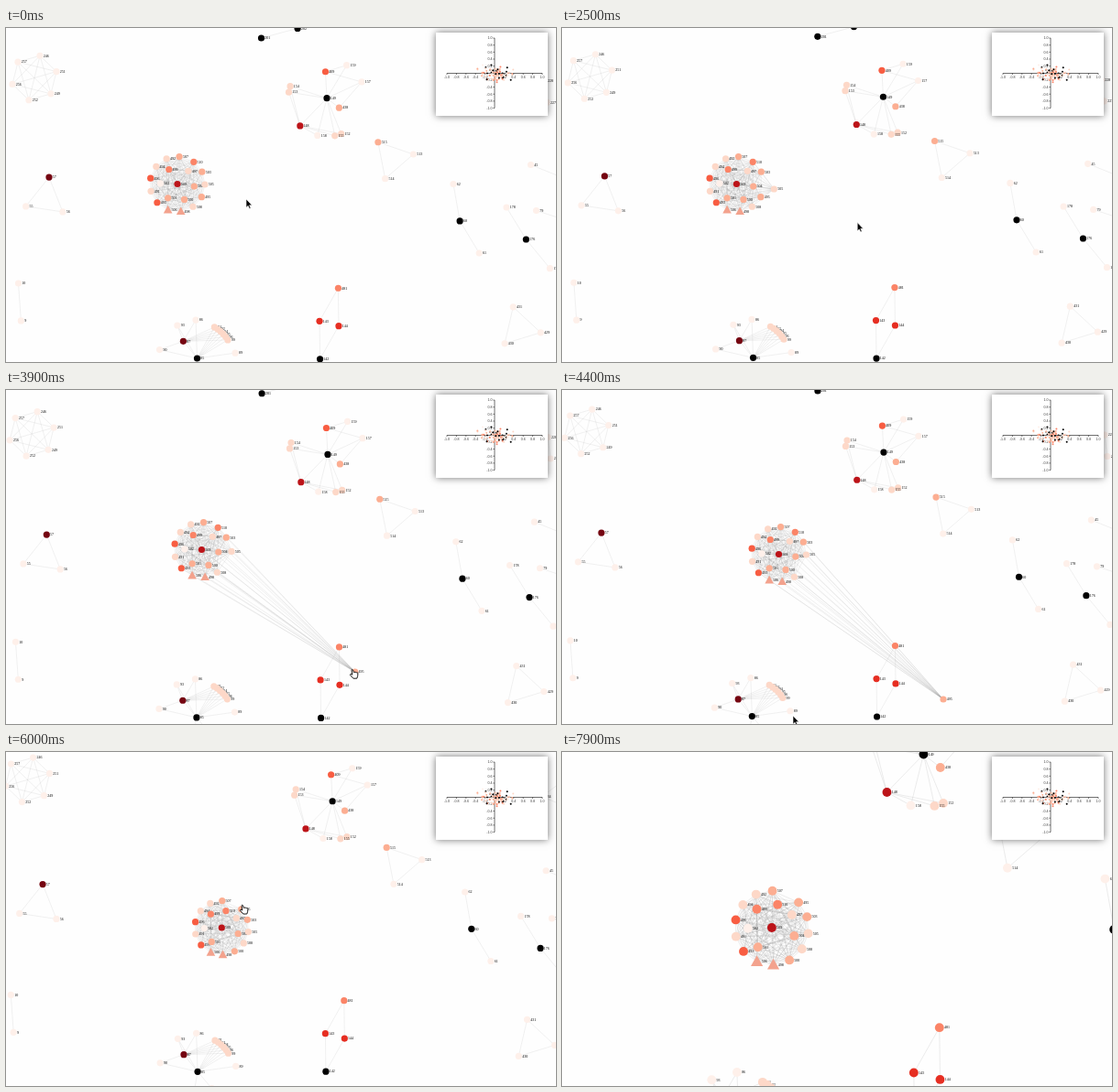
An HTML page with a canvas for the animation above (8 s loop, 600 by 365 pixels).

```html
<!DOCTYPE html>
<html lang="en">
<head>
<meta charset="utf-8">
<title>Force-directed network</title>
<style>
html, body { margin: 0; width: 100%; height: 100%; overflow: hidden; background: #fefefe }
canvas { display: block; width: 600px; height: 365px }
</style>
</head>
<body>
<canvas id="stage"></canvas>
<script>
const LOOP = 8000, STEP = 100, EDGE = 42, RADIUS = 3.6;
const canvas = document.getElementById('stage'), ctx = canvas.getContext('2d');
const dpr = window.devicePixelRatio || 1;
canvas.width = 600 * dpr;
canvas.height = 365 * dpr;

// Linear interpolation over keys of the form [time, ...values]
function at(keys, t) {
  let i = keys.findIndex(k => k[0] > t);
  if (i < 0) i = keys.length;
  const a = keys[Math.max(i - 1, 0)], b = keys[Math.min(i, keys.length - 1)];
  const u = a === b ? 0 : (t - a[0]) / (b[0] - a[0]);
  return a.slice(1).map((v, j) => v + (b[j + 1] - v) * u);
}
const mix = (a, b, u) => a.map((v, i) => v + (b[i] - v) * u);
const polar = (x, y, r, deg) => [x + r * Math.cos(deg * Math.PI / 180), y + r * Math.sin(deg * Math.PI / 180)];
const words = text => text.split(' ');

// Pale to dark, then black, with the labels that wear each color
const palette = [
  ['#fef0ea', ''],
  ['#fdd8c8', '154 153 152 155 91 92 94 95 96 99 492 494 497 491 508 505'],
  ['#fcae92', '438 515 507 495 503 504 501 500'],
  ['#fb8467', '481 510 499'],
  ['#f85d42', '409 496 493'],
  ['#e62e22', '143 144'],
  ['#bc1419', '148 509'],
  ['#750511', '57 87'],
  ['#000', '85 149 60 176 142 201 202']
];
const colorOf = label => (palette.find(([, list]) => words(list).includes(label)) || palette[0])[0];

const nodes = {}, links = [];

// Components spread away from each other: [time, growth, shift x, shift y]
const drift = [[1900, 0, 0, 0], [3300, 0.007, -1.4, -3.9], [4400, 0.0162, -4.7, -10], [6000, 0.043, -8.8, -26.5]];

const every = () => true, path = (i, j) => i - j === 1, hub = (i, j) => j === 0;

function connect(labels, linked, extra = '') {
  labels.forEach((a, i) => labels.slice(0, i).forEach((b, j) => linked(i, j) && links.push([a, b])));
  if (extra) for (const pair of words(extra)) links.push(pair.split('-'));
}

function group(names, place, linked, extra) {
  const labels = words(names), points = labels.map((_, i) => place(i));
  const mean = [0, 1].map(k => points.reduce((sum, p) => sum + p[k], 0) / points.length);
  labels.forEach((label, i) => {
    nodes[label] = t => {
      const [grow, ...shift] = at(drift, t);
      return points[i].map((v, k) => v + grow * mean[k] + shift[k]);
    };
  });
  connect(labels, linked, extra);
}

const ring = (x, y, r, start, step) => i => polar(x, y, r, start + i * step);

function chain(x, y, heading, turn = 0) {
  const points = [[x, y]];
  return i => {
    while (points.length <= i) points.push(polar(...points.at(-1), EDGE - 1, heading + turn * (points.length - 1)));
    return points[i];
  };
}

// Node 0 in the middle, then one node per angle or [angle, length]
const spokes = (x, y, stems) => i => {
  if (!i) return [x, y];
  const [deg, length = EDGE] = [stems[i - 1]].flat();
  return polar(x, y, length, deg);
};

group('257 246 251 249 252 256', ring(31, 54.5, 25, -136, 60), every);
group('57 55 56', ring(43.5, 186.3, 23.5, -81.5, -120), every);
group('515 513 514', ring(421.3, 142.5, 23.5, -131, 120), every);
group('431 429 430', ring(560.2, 327.5, 23.7, -107, 120), every);
group('228 227 234', ring(582, 70.5, 13.6, -67, 120), every);
group('10 9', chain(13.5, 279, 86), path);
group('62 60 61', chain(488, 170.5, 80, -21), path);
group('178 176 177', chain(546, 196, 58.6, -8), path);
group('45 46', chain(572.5, 149.5, 22), path);
group('79 78', chain(578.5, 199.5, 18), path);
group('201 202 203', chain(278.5, 11, -15, -8), path);
// Thin rhombus
group('481 143 142 144', i => polar(352.5, 323, i % 2 ? 10.8 : 40, -75.6 - 90 * i), path, '144-481');
group('149 154 153 159 157 158 155 152 148 409 438',
  spokes(350, 76.7, [198, 189, -59, -25, 104, 78, 68, 134, [-93, 29], [38, 17]]), hub,
  '148-154 148-153 148-152 148-155 148-158 409-159 409-157 438-157 153-154');
group('85 87 93 86 90 89 97 98 91 92 94 95 96 99',
  spokes(208.5, 361, [[-129, 24], -121, -92, -167, -8, [100, 24], [50, 24],
    ...Array.from({ length: 6 }, (_, i) => [-61 + 6 * i, 39])]), hub,
  '87-93 87-86 87-90 87-91 87-92 87-94 87-95 87-96 87-99');

// Dense cluster: two rings around one node, reordered after the pull; _ is an empty slot
const slots = (names, r, start, step) => words(names).map((label, i) => [label, polar(0, 0, r, start + i * step)]);
const before = Object.fromEntries([['509', [0, 0]],
  ...slots('507 492 494 496 491 493 506 498 508 495 505 503 510', 30, -86, -27.3),
  ...slots('499 502 501 500 504 497', 18.5, -120, -58)]);
const after = Object.fromEntries([['509', [0, 0]],
  ...slots('507 492 494 496 491 493 506 498 500 508 505 503 495', 29.4, -89, -26.2),
  ...slots('510 499 502 501 _ 504 497', 19, -76, -52.8)]);
const center = [[1900, 187, 170.5], [3300, 195, 170.5], [3500, 195, 170.5], [4400, 236.5, 179.5], [6000, 235.3, 192]];
const reorder = [[4400, 0], [6000, 1]];
const pulls = {
  505: { to: [337, 224], keys: [[1100, 0], [1700, 1], [1900, 0.12], [3500, 0.05], [4400, 0]] },
  495: { to: [416, 338], keys: [[3500, 0], [4000, 1], [4800, 1], [5600, 0]] }
};
for (const label in before) nodes[label] = t => {
  const mid = at(center, t), slot = mix(before[label], after[label], at(reorder, t)[0]);
  const home = [mid[0] + slot[0], mid[1] + slot[1]], pull = pulls[label];
  return pull ? mix(home, pull.to, at(pull.keys, t)[0]) : home;
};
connect(Object.keys(before), every);

// Zoom toward the cluster: [time, scale, x, y]
const view = [[6200, 1, 0, 0], [6700, 1.26, -65.3, -47], [7900, 1.37, -93.5, -71]];

function drawNetwork(t) {
  const [scale, dx, dy] = at(view, t), pos = {};
  for (const label in nodes) pos[label] = nodes[label](t);
  ctx.save();
  ctx.translate(dx, dy);
  ctx.scale(scale, scale);
  ctx.strokeStyle = 'rgba(140,140,140,.17)';
  ctx.lineWidth = 0.7;
  for (const [a, b] of links) {
    ctx.beginPath();
    ctx.moveTo(...pos[a]);
    ctx.lineTo(...pos[b]);
    ctx.stroke();
  }
  // Labels keep their size on screen
  ctx.font = `${4 / scale}px "Liberation Serif", serif`;
  ctx.textAlign = 'left';
  for (const label in pos) {
    const [x, y] = pos[label], triangle = label === '506' || label === '498';
    ctx.fillStyle = triangle ? '#f3a28d' : colorOf(label);
    ctx.beginPath();
    if (triangle) {
      ctx.moveTo(x, y - 4.8);
      ctx.lineTo(x + 4.8, y + 3.8);
      ctx.lineTo(x - 4.8, y + 3.8);
    } else ctx.arc(x, y, RADIUS, 0, 7);
    ctx.fill();
    ctx.fillStyle = '#000';
    ctx.fillText(label, x + 3.8, y + 1.3 / scale);
  }
  ctx.restore();
}

// Scatter plot dots from a seeded generator
let seed = 11;
const random = () => (seed = seed * 16807 % 2147483647) / 2147483647;
const bell = () => random() + random() - 1;
const dotColors = [0, 1, 1, 1, 2, 2, 2, 3, 8, 8].map(i => palette[i][0]);
const dots = Array.from({ length: 95 }, () =>
  [535 + bell() * 21, 49.5 + bell() * 10, dotColors[Math.floor(random() * 10)]]);

function drawPlot() {
  ctx.save();
  ctx.shadowColor = 'rgba(0,0,0,.55)';
  ctx.shadowBlur = 8 * dpr;
  ctx.fillStyle = '#fff';
  ctx.fillRect(469, 5, 122, 91);
  ctx.restore();
  ctx.strokeStyle = ctx.fillStyle = '#333';
  ctx.lineWidth = 0.7;
  ctx.font = '3.6px "Liberation Sans", sans-serif';
  ctx.beginPath();
  ctx.moveTo(481, 49.5);
  ctx.lineTo(585, 49.5);
  ctx.moveTo(533, 11);
  ctx.lineTo(533, 87.5);
  for (let i = -5; i <= 5; i++) {
    if (!i) continue;
    const x = 533 + i * 10.4, y = 49.3 - i * 7.65, label = (i / 5).toFixed(1);
    ctx.moveTo(x, 49.5);
    ctx.lineTo(x, 51);
    ctx.moveTo(533, y);
    ctx.lineTo(531.5, y);
    ctx.textAlign = 'center';
    ctx.fillText(label, x, 54.5);
    ctx.textAlign = 'right';
    ctx.fillText(label, 530.5, y + 1.3);
  }
  ctx.stroke();
  for (const [x, y, color] of dots) {
    ctx.fillStyle = color;
    ctx.beginPath();
    ctx.arc(x, y, 1, 0, 7);
    ctx.fill();
  }
}

const pointer = [[0, 262, 187], [300, 400, 317], [600, 532, 47], [900, 235, 170], [1100, 216, 171], [1700, 337, 221],
  [2300, 337, 221], [2800, 300, 200], [3300, 279, 184], [3500, 221, 182], [4000, 416, 336], [4100, 416, 336],
  [4400, 252, 356], [4800, 416, 336], [5600, 257, 167]];
const arrow = new Path2D('M0 0V9.2L2.1 7.3L3.6 10.4L5 9.7L3.6 6.7H6.4Z');
const hand = new Path2D('M0 .8Q.8-.6 1.6.8L2.4 3.4Q3.2 2.6 4 3.4Q5 2.7 5.5 3.6Q6.8 3.2 6.9 4.6L6.7 7.2L5.8 10H1.8L-1.6 6.2Q-1.6 4.8 0 5.4L.8 6Z');

function drawPointer(t) {
  if (t >= 7300) return;
  const grab = (t >= 1100 && t < 2400) || (t >= 3500 && t < 4100) || t >= 4800;
  const shape = grab ? hand : arrow;
  ctx.save();
  ctx.translate(...at(pointer, t));
  ctx.fillStyle = grab ? '#fff' : '#000';
  ctx.strokeStyle = grab ? '#000' : '#fff';
  ctx.lineWidth = grab ? 0.9 : 0.6;
  ctx.fill(shape);
  ctx.stroke(shape);
  ctx.restore();
}

function draw(now) {
  const t = Math.floor(now % LOOP / STEP) * STEP;
  ctx.setTransform(dpr, 0, 0, dpr, 0, 0);
  ctx.fillStyle = '#fefefe';
  ctx.fillRect(0, 0, 600, 365);
  drawNetwork(t);
  drawPlot();
  drawPointer(t);
}

const begin = performance.now();
function frame() {
  draw(performance.now() - begin);
  requestAnimationFrame(frame);
}
frame();
</script>
</body>
</html>
```
